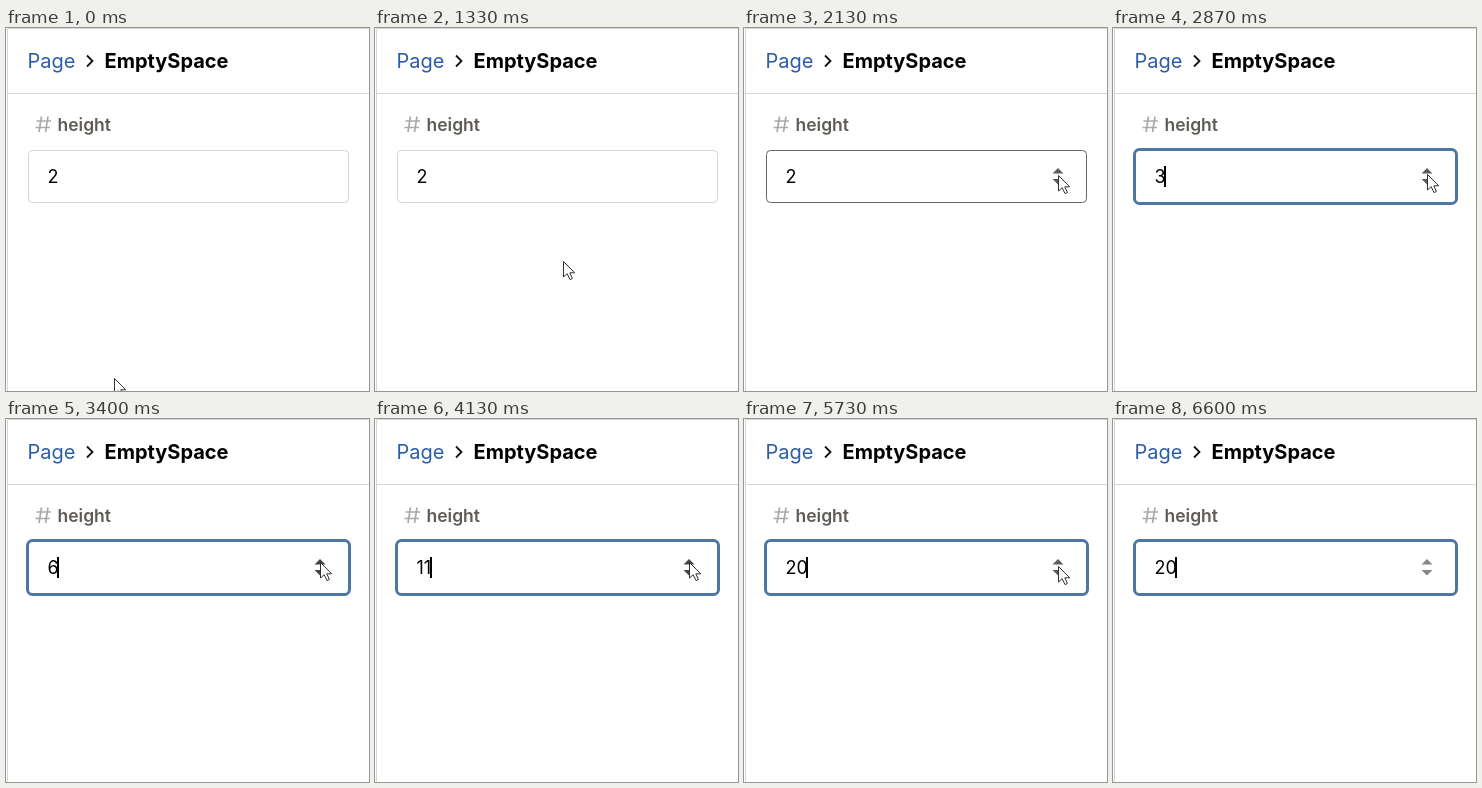
An HTML page for the animation above (6740 ms loop, 363 by 363 pixels).

```html
<!DOCTYPE html>
<html lang="en">
<head>
<meta charset="utf-8">
<title>Height field</title>
<style>
  html, body { margin: 0; width: 100%; height: 100%; overflow: hidden; background: #fff; }
  svg { display: block; width: 363px; height: 363px; font-family: Inter, sans-serif; }
</style>
</head>
<body>
<svg viewBox="0 0 363 363">
  <path d="M1.5 363V.5H363M1.5 65.5H363" fill="none" stroke="#d6d6d6"/>
  <text x="21.5" y="40" font-size="20" fill="#2b5da8">Page</text>
  <path d="M81 27.5l5.5 5.5-5.5 5.5" fill="none" stroke="#111" stroke-width="1.8"/>
  <text x="98.5" y="40" font-size="20" font-weight="700">EmptySpace</text>
  <path d="M35.5 88.5l-2.5 15.5M42 88.5l-2.5 15.5M30.5 93H45M29.5 99.5H44" fill="none" stroke="#aaa" stroke-width="1.7"/>
  <text x="51.5" y="103" font-size="17.5" font-weight="600" fill="#5f5c57">height</text>
  <rect id="box" fill="#fff"/>
  <text id="value" x="41.5" y="155" font-size="18"></text>
  <rect id="caret" y="138" width="2" height="21"/>
  <path id="spinner" d="M308.5 145.5l5.5-5.5 5.5 5.5zM308.5 151h11l-5.5 5.5z"/>
  <path id="pointer" d="M.5.5V16L4.2 12.7 7 18.6 9.4 17.5 6.8 11.8H11.7Z" fill="#fff" stroke="#333"/>
</svg>
<script>
const LOOP = 6740;
const HOVER = 1590, FOCUS = 2395, LEAVE = 5790, GONE = 5860;

// [time, x, y]
const path = [
  [930, 108, 350], [1330, 188, 233], [1530, 255, 180], [1670, 295, 152],
  [1870, 321, 150], [2130, 314, 147], [2860, 314, 147], [2930, 314, 143],
  [5600, 314, 143], [5700, 314, 147], [5780, 314, 147], [5800, 292, 213]
];
// [time, value]
const values = [
  [0, 2], [2400, 3], [3070, 4], [3200, 5], [3400, 6], [3530, 7], [3670, 8],
  [3870, 9], [3930, 10], [4070, 11], [4200, 12], [4330, 13], [4470, 14],
  [4530, 15], [4730, 16], [5130, 17], [5270, 18], [5400, 19], [5470, 20]
];

const [box, value, caret, spinner, pointer] =
  ['box', 'value', 'caret', 'spinner', 'pointer'].map(id => document.getElementById(id));

const set = (node, attrs) => {
  for (const name in attrs) node.setAttribute(name, attrs[name]);
};
const show = (node, on) => { node.style.visibility = on ? 'visible' : 'hidden'; };

function positionAt(t) {
  const next = path.findIndex(p => p[0] > t);
  if (next === 0) return path[0].slice(1);
  if (next < 0) return path.at(-1).slice(1);
  const [t0, x0, y0] = path[next - 1], [t1, x1, y1] = path[next];
  const k = (t - t0) / (t1 - t0);
  return [x0 + (x1 - x0) * k, y0 + (y1 - y0) * k].map(Math.round);
}

function drawBox(t) {
  const focused = t >= FOCUS;
  set(box, focused
    ? { x: 21.5, y: 121.5, width: 322, height: 54, rx: 5, stroke: '#4d76a5', 'stroke-width': 3 }
    : { x: 22.5, y: 122.5, width: 320, height: 52, rx: 4, stroke: t >= HOVER ? '#666' : '#d3d3d3', 'stroke-width': 1 });
}

function render(t) {
  drawBox(t);
  const [changed, number] = values.findLast(v => v[0] <= t + 5);
  value.textContent = number;
  set(caret, { x: Math.round(41 + value.getComputedTextLength()) - 1 });
  show(caret, t >= FOCUS && Math.floor((t + 5 - changed) / 530) % 2 === 0);

  const pressed = t >= 3060 && t < 5600;
  show(spinner, t >= HOVER);
  set(spinner, { fill: t >= LEAVE ? '#868686' : pressed ? '#444' : '#5c5c5c' });

  const [x, y] = positionAt(t);
  set(pointer, { transform: `translate(${x} ${y})` });
  show(pointer, t < GONE);
}

const start = performance.now();
function tick() {
  render((performance.now() - start) % LOOP);
  requestAnimationFrame(tick);
}
tick();
</script>
</body>
</html>
```
